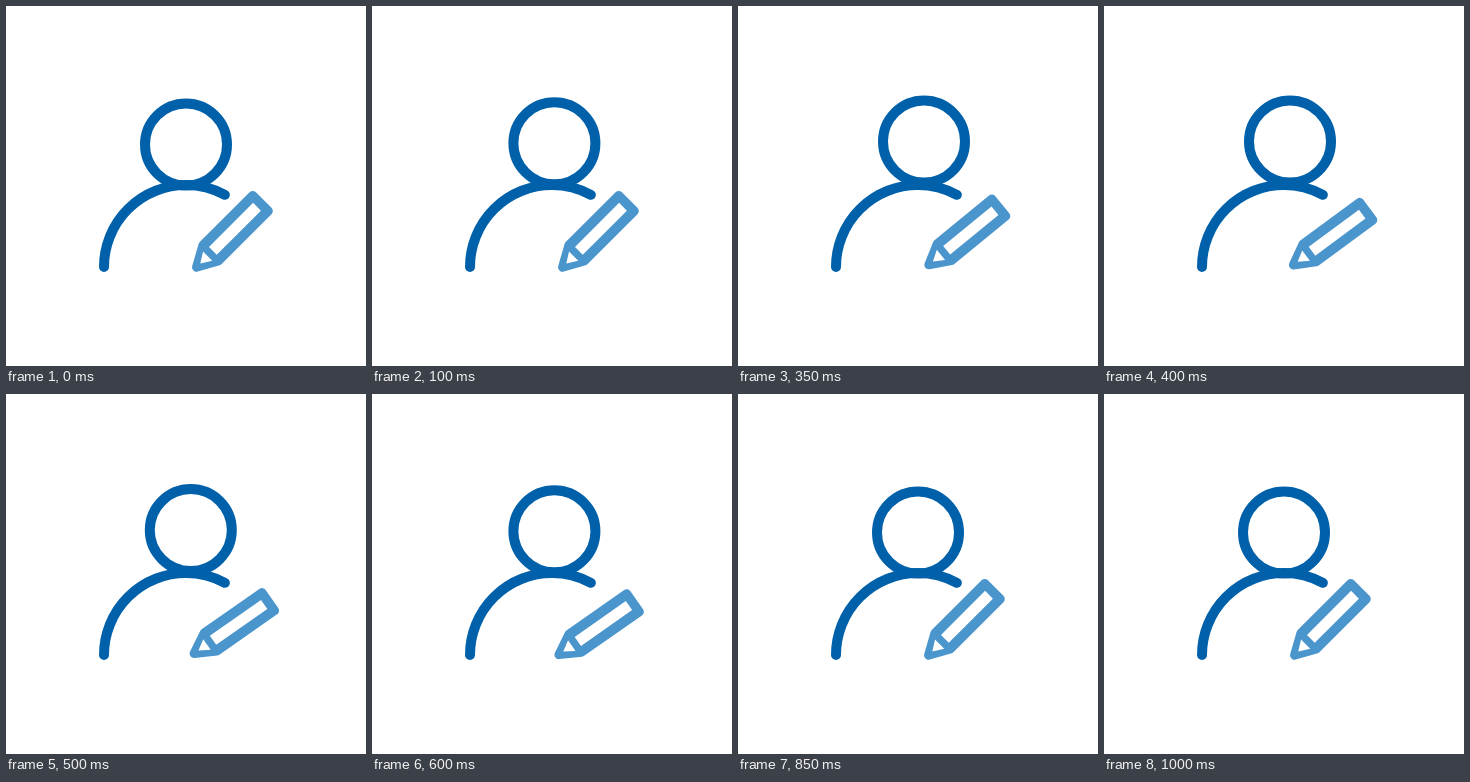
These frames come from a looping animation (360x360 px, 1.05 s). An HTML page with a canvas:

```html
<!DOCTYPE html>
<html lang="en">
<head>
<meta charset="utf-8">
<title>Edit user</title>
<style>
html, body { margin: 0; width: 100%; height: 100%; overflow: hidden; background: #fff; }
canvas { display: block; width: 360px; height: 360px; }
</style>
</head>
<body>
<canvas id="stage" width="360" height="360"></canvas>
<script>
const ctx = document.getElementById('stage').getContext('2d');
const LOOP = 1050, STEP = 50;
const DARK = '#0061aa', LIGHT = '#4b95cd';

const ramp = (t, from, to) => Math.min(1, Math.max(0, (t - from) / (to - from)));

// Rises from a to b, holds, falls from c to d
const pulse = (t, a, b, c, d) => ramp(t, a, b) * (1 - ramp(t, c, d));

function arc(x, y, r, from, to) {
  ctx.beginPath();
  ctx.arc(x, y, r, from, to);
  ctx.stroke();
}

// Fills a shape mirrored across the x axis, given its lower half
function mirrored(color, round, half) {
  const upper = half.map(([x, y]) => [x, -y]).reverse();
  ctx.beginPath();
  half.concat(upper).forEach(([x, y]) => ctx.lineTo(x, y));
  ctx.closePath();
  ctx.fillStyle = ctx.strokeStyle = color;
  ctx.fill();
  if (round) {
    ctx.lineWidth = round * 2;
    ctx.stroke();
  }
}

function drawPerson(t) {
  const lift = pulse(t, 0, 250, 450, 700);
  ctx.strokeStyle = DARK;
  ctx.lineWidth = 10;
  arc(180, 261, 82, Math.PI, -1.077);
  arc(180 + 6 * lift, 138.5 - 3 * lift, 41, 0, Math.PI * 2);
}

function drawPencil(t) {
  const slide = pulse(t, 100, 300, 450, 700);
  const turn = 10 * pulse(t, 250, 425, 600, 700);
  ctx.save();
  // Swing about a point left of the pencil
  ctx.translate(185 + 3 * slide, 234 - 2.8 * slide);
  ctx.rotate(turn * Math.PI / 180);
  ctx.translate(37, -4.25);
  ctx.rotate(-Math.PI / 4);
  mirrored(LIGHT, 4.5, [[46, 11], [-24.5, 11], [-44.5, 0]]);
  mirrored('#fff', 0, [[41, 5.5], [-21.4, 5.5]]);
  mirrored('#fff', 0, [[-28.8, 6.5], [-39.2, 0]]);
  ctx.restore();
}

function draw(now) {
  const t = Math.floor((now % LOOP) / STEP) * STEP;
  ctx.fillStyle = '#fff';
  ctx.fillRect(0, 0, 360, 360);
  ctx.lineCap = ctx.lineJoin = 'round';
  drawPerson(t);
  drawPencil(t);
}

let start;
function tick(now) {
  if (start === undefined) start = now;
  draw(now - start);
  requestAnimationFrame(tick);
}
draw(0);
requestAnimationFrame(tick);
</script>
</body>
</html>
```
